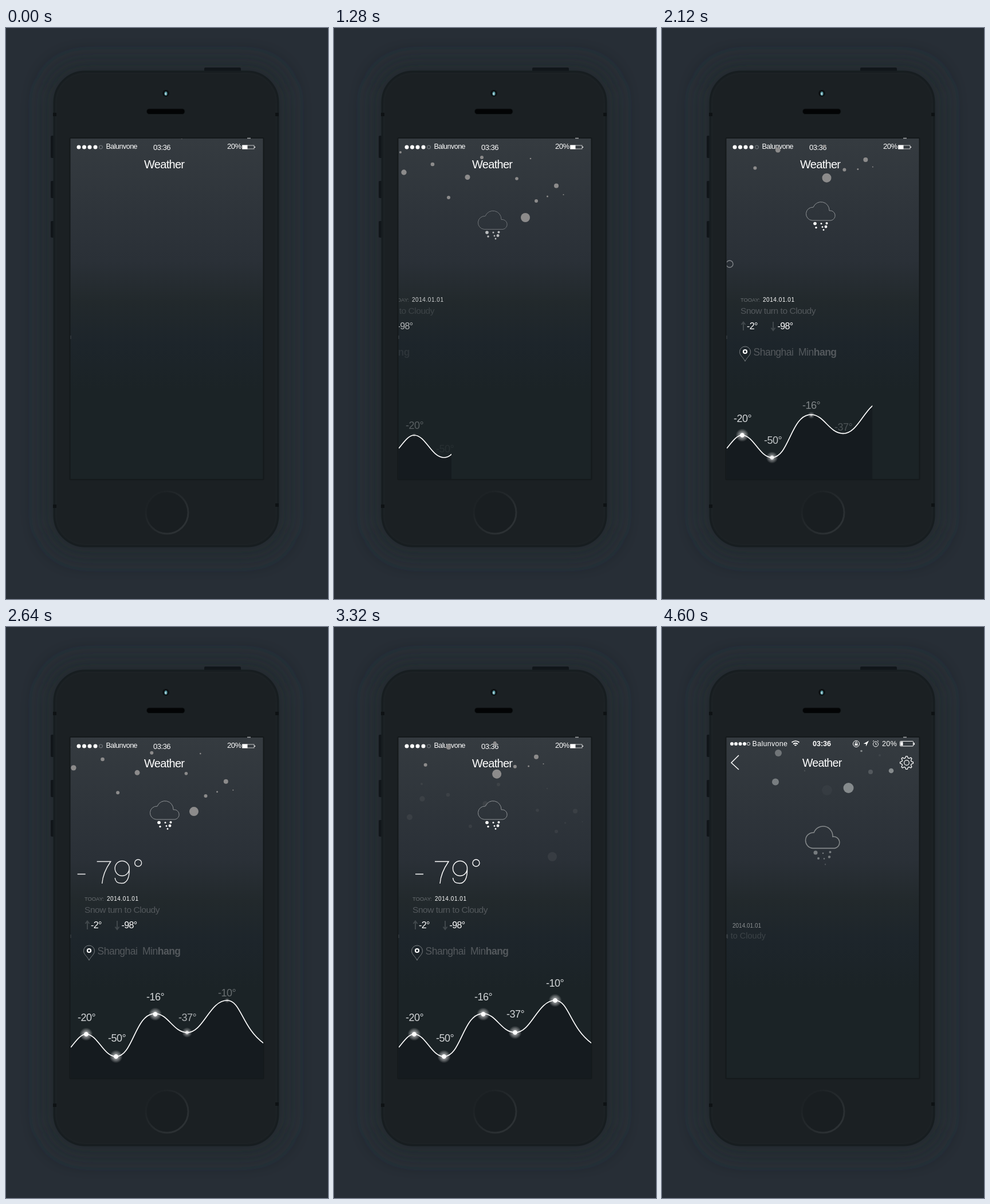
An HTML page for the animation above (5 s loop, 562x997 px).

```html
<!DOCTYPE html>
<html lang="en">
<head>
<meta charset="utf-8">
<title>Weather app</title>
<style>
  html, body { margin: 0; width: 100%; height: 100%; overflow: hidden; background: #272e36; }
  svg { display: block; width: 562px; height: 997px; }
  text { font-family: "Liberation Sans", Arial, sans-serif; fill: #fff; white-space: pre; }
  .line { fill: none; stroke: #fff; }
  .dim { fill: #54595d; }
  .status { font-size: 12.5px; letter-spacing: -.5px; }
  .temp { font-size: 16px; letter-spacing: -.6px; }
  .label { font-size: 18px; letter-spacing: -.5px; fill: #d3d6d8; }
</style>
</head>
<body>
<svg viewBox="0 0 562 997">
  <defs>
    <linearGradient id="sky" x1="0" y1="0" x2="0" y2="1">
      <stop offset="0" stop-color="#353b40"/>
      <stop offset=".36" stop-color="#2a3037"/>
      <stop offset=".48" stop-color="#22292c"/>
      <stop offset=".6" stop-color="#1d252b"/>
      <stop offset=".74" stop-color="#1b2326"/>
      <stop offset="1" stop-color="#1b2326"/>
    </linearGradient>
    <linearGradient id="rim" x1="0" y1="0" x2="1" y2="1">
      <stop offset=".2" stop-color="#1d2225"/>
      <stop offset="1" stop-color="#303538"/>
    </linearGradient>
    <radialGradient id="glow">
      <stop offset="0" stop-color="#fff"/>
      <stop offset=".3" stop-color="#fff"/>
      <stop offset=".38" stop-color="#fff" stop-opacity=".5"/>
      <stop offset="1" stop-color="#fff" stop-opacity="0"/>
    </radialGradient>
    <filter id="blur" x="-30%" y="-30%" width="160%" height="160%"><feGaussianBlur stdDeviation="20"/></filter>
    <clipPath id="screen"><rect x="113" y="193" width="336" height="595"/></clipPath>
    <clipPath id="reveal"><rect id="wipe" x="113" y="600" width="0" height="188"/></clipPath>
    <path id="cloudShape" d="M262 336A11.5 11.5 0 0 1 264 313A14.5 14.5 0 0 1 292 319A8.5 8.5 0 1 1 295 336Z"/>
  </defs>

  <!-- Phone -->
  <rect width="562" height="997" fill="#272e36"/>
  <rect x="68" y="60" width="423" height="861" rx="65" fill="#232c2d" filter="url(#blur)"/>
  <g fill="#11161a">
    <rect x="78" y="188" width="8" height="39" rx="2"/>
    <rect x="78" y="267" width="8" height="30" rx="2"/>
    <rect x="78" y="337" width="8" height="29" rx="2"/>
    <rect x="346" y="69" width="64" height="9" rx="2"/>
  </g>
  <rect x="84" y="76" width="391" height="829" rx="54" fill="#1b2023" stroke="#171d20" stroke-width="3"/>
  <rect x="87.500" y="79.500" width="384" height="822" rx="51" fill="none" stroke="#1e2427"/>
  <path d="M82 148h6v6h-6zM470 148h6v6h-6zM82 832h6v6h-6zM470 830h6v6h-6z" fill="#0e1214"/>
  <circle cx="279" cy="114" r="6" fill="#0d1113"/>
  <ellipse cx="279" cy="114.500" rx="2.500" ry="3.500" fill="#5c9ba5"/>
  <circle cx="278.500" cy="115" r="1.300" fill="#c9e6ea"/>
  <rect x="245.500" y="141" width="66.500" height="9.500" rx="4.500" fill="#030405" stroke="#14191b"/>
  <circle cx="281" cy="846" r="37" fill="#191e21" stroke="url(#rim)" stroke-width="3"/>
  <rect x="111.500" y="192" width="338" height="596.500" rx="1" fill="url(#sky)" stroke="#14191b" stroke-width="2"/>
  <path d="M421 192.500h6" stroke="#a4a7a9" stroke-width="1.500"/>
  <path d="M113 537v6" stroke="#43494d"/>

  <g id="app" clip-path="url(#screen)">
    <g class="status">
      <g fill="#fff"><circle cx="127" cy="208" r="3.500"/><circle cx="136.500" cy="208" r="3.500"/><circle cx="146" cy="208" r="3.500"/><circle cx="156" cy="208" r="3.500"/></g>
      <circle cx="165.500" cy="208" r="3" fill="none" stroke="#90969a" stroke-width=".8"/>
      <text x="174.500" y="211">Balunvone</text>
      <text x="257" y="213" font-size="13">03:36</text>
      <text x="386" y="211" font-size="13">20%</text>
      <rect x="412.500" y="205" width="20.500" height="6" class="line" stroke-width=".7"/>
      <path d="M412.500 204.500h9v7h-9zM433.500 207h1.500v2h-1.500z" fill="#fff"/>
    </g>
    <text x="241" y="245" font-size="20" letter-spacing="-.7">Weather</text>

    <g id="cloud">
      <use href="#cloudShape" fill="none" stroke="#8f9396"/>
      <g fill="#fff"><circle cx="267" cy="341.500" r="2.800"/><circle cx="278" cy="341.500" r="1.500"/><circle cx="287.500" cy="341" r="2"/><circle cx="286" cy="347" r="2.400"/><circle cx="269" cy="348.500" r="1.700"/><circle cx="280" cy="347.500" r="1.400"/><circle cx="282" cy="352.500" r="1.400"/></g>
    </g>

    <g id="reading" class="line" stroke-width="1.400">
      <path d="M142 431.500H156M176 409.500H200C192 421 186 434 185 448"/>
      <path d="M232.500 421.500A12.500 13 0 1 1 207.500 421.500A12.500 13 0 1 1 232.500 421.500C233 439 228 447.500 219 447.500C212 447.500 208 444 207.500 438"/>
      <circle cx="248" cy="412" r="6"/>
    </g>
    <g id="date">
      <text x="137" y="478" font-size="9.500" letter-spacing="-.1" style="fill:#686d70">TOOAY:</text>
      <text x="176" y="478" font-size="10" letter-spacing=".55">2014.01.01</text>
    </g>
    <text id="summary" class="dim" x="137" y="498.500" font-size="15.500" letter-spacing="-.45">Snow turn to Cloudy</text>
    <g id="range">
      <path d="M142 528V514M138.500 518L142 513.500L145.500 518M194 513V527M190.500 523.500L194 528L197.500 523.500" fill="none" stroke="#41484c" stroke-width="2"/>
      <text class="temp" x="148" y="526">-2°</text>
      <text class="temp" x="201.500" y="526">-98°</text>
    </g>
    <g id="place">
      <path d="M145 582C142 575 135.500 572 135.500 565.500A9.500 9.500 0 0 1 154.500 565.500C154.500 572 148 575 145 582Z" fill="none" stroke="#7e8386"/>
      <circle cx="145" cy="565" r="3" class="line" stroke-width="2.200"/>
      <text class="dim" x="159.500" y="572" font-size="17.500" letter-spacing="-.5">Shanghai</text>
      <text class="dim" x="238" y="572" font-size="17.500" letter-spacing="-.5">Min<tspan font-weight="bold">hang</tspan></text>
    </g>

    <g clip-path="url(#reveal)">
      <path id="area" fill="#141b1e" fill-opacity=".9"/>
      <path id="curve" class="line" stroke-width="1.700"/>
    </g>
    <g id="points"></g>
    <g id="snow" fill="#8c8b8b"></g>
  </g>

  <g id="cover" clip-path="url(#screen)" font-weight="bold">
    <g fill="#fff"><circle cx="122" cy="204" r="3"/><circle cx="129" cy="204" r="3"/><circle cx="136.500" cy="204" r="3"/><circle cx="144" cy="204" r="3"/></g>
    <circle cx="151" cy="204" r="2.600" class="line" stroke-width=".8"/>
    <text x="157.500" y="208" font-size="12.500" font-weight="normal" letter-spacing=".3">Balunvone</text>
    <path class="line" stroke-width="1.700" d="M226.500 201.500Q233 196.500 239.500 201.500M229 204.500Q233 201 237 204.500M231.500 207Q233 205.500 234.500 207"/>
    <text x="263" y="208" font-size="12.500">03:36</text>
    <g class="line">
      <circle cx="339" cy="204" r="5.500"/>
      <path d="M337.500 203.500v-1.500a1.500 1.500 0 0 1 3 0v1.500"/>
      <circle cx="373" cy="204.500" r="4.500"/>
      <path d="M373 202v3h2M368 200l2-2M378 200l-2-2"/>
      <rect x="415.500" y="199.500" width="23" height="8.500" rx="1"/>
      <path d="M134 224L121 237L134 249" stroke-width="1.500"/>
      <circle cx="427" cy="237" r="4.300" stroke-width="1.200"/>
      <path id="gear" stroke-width="1.300"/>
    </g>
    <path fill="#fff" d="M336.500 203.500h5v3.500h-5zM361 198.500L351.500 204H356V208.500ZM416.500 200.500h4v6.500h-4zM439.500 202h1.500v4h-1.500z"/>
    <text x="384" y="208" font-size="12.500" font-weight="normal" letter-spacing=".4">20%</text>
    <text x="245" y="244" font-size="19.500" font-weight="normal" letter-spacing="-.7">Weather</text>
    <use href="#cloudShape" transform="translate(250 346.500) scale(1.17 1.19) translate(-251 -302.500)" fill="none" stroke="#85898b" stroke-width="1.300"/>
    <g fill="#777c7f"><circle cx="268" cy="394" r="3.500"/><circle cx="281" cy="395" r="1.300"/><circle cx="293.500" cy="393" r="2"/><circle cx="292" cy="401.500" r="2.200"/><circle cx="273" cy="404" r="2"/><circle cx="283" cy="404.500" r="1.300"/><circle cx="285" cy="414.500" r="1.200" opacity=".5"/></g>
    <g fill="#858a8c"><circle cx="203" cy="220" r="6" opacity=".75"/><circle cx="198" cy="270.500" r="6" opacity=".85"/><circle cx="325.500" cy="281" r="9"/><circle cx="400" cy="251" r="4.300"/><circle cx="348" cy="216.500" r="1.800"/><circle cx="364" cy="253" r="4" opacity=".4"/><circle cx="288" cy="285" r="9" opacity=".08"/><circle cx="380" cy="224" r="2" opacity=".15"/><circle cx="249" cy="251" r="1.200" opacity=".3"/></g>
    <text x="123" y="525" font-size="10" font-weight="normal" style="fill:#8b8f91">2014.01.01</text>
    <text x="181" y="543.500" font-size="14.500" font-weight="normal" text-anchor="end" style="fill:#3d4448">Snow turn to Cloudy</text>
  </g>
</svg>

<script>
const LOOP = 5000, STEP = 40, COVER_AT = 4600;
const $ = id => document.getElementById(id);
const progress = (t, from, to) => Math.min(1, Math.max(0, (t - from) / (to - from)));

function add(parent, tag, attrs, text = "") {
  const el = document.createElementNS("http://www.w3.org/2000/svg", tag);
  for (const key in attrs) el.setAttribute(key, attrs[key]);
  el.textContent = text;
  return parent.appendChild(el);
}

function pose(el, x, y, opacity, scale = 1) {
  el.setAttribute("transform", `translate(${x} ${y}) scale(${scale})`);
  el.setAttribute("opacity", opacity);
}

// Temperature curve
const line = "M113 734C123 722 130 711 140 711C160 711 170 750 192 750C222 750 225 675 260 675" +
  "C283 675 292 708 316 708C345 708 355 652 386 652C410 652 412 700 450 727";
$("curve").setAttribute("d", line);
$("area").setAttribute("d", line + "V788H113Z");

// Gear outline: eight teeth
const teeth = Array.from({ length: 32 }, (_, i) => {
  const a = (i - 1.5) * Math.PI / 16, r = i % 4 === 1 || i % 4 === 2 ? 11.5 : 8.5;
  return `${427 + r * Math.cos(a)} ${237 + r * Math.sin(a)}`;
});
$("gear").setAttribute("d", `M${teeth.join("L")}Z`);

// Curve points: x, y, label, label x, label baseline, label rise
const WIPE_START = 803, WIPE_SPEED = 0.193;
const points = [
  [140, 711, "-20°", 125, 688, 18],
  [192, 750, "-50°", 178, 724, 18],
  [260.5, 676, "-16°", 245, 652, 29],
  [316, 708, "-37°", 301, 682, 29],
  [386, 652, "-10°", 370, 628, 29]
].map(([x, y, text, labelX, labelY, rise]) => ({
  x, y, rise,
  start: WIPE_START + (x - 113) / WIPE_SPEED,
  dot: add($("points"), "circle", { r: 11.5, fill: "url(#glow)" }),
  label: add($("points"), "text", { class: "label", x: labelX, y: labelY }, text)
}));

// Snowflakes: x, y, radius, drift x, drift y, seen DRIFT_AT ms into a shower
const DRIFT_AT = 1262, DRIFT_TIME = 603;
const flakes = [
  [334, 331, 8, 47, 70], [388, 275.5, 4, 33, 46], [353, 302, 3, 35, 55], [372.5, 294, 1.5, 31, 48],
  [400.5, 291, 1, 33, 49], [319, 263, 2.8, 36, 57], [343, 228, 1.3, 29, 54], [258, 226, 3, 29, 49],
  [233, 260.5, 4.5, 31, 48], [200, 296, 3, 38, 52], [172, 238, 3.3, 27, 55], [122, 252, 4.7, 32, 48],
  [116, 217, 2, 37, 57], [100, 284, 5, 32, 48]
];
const showers = [18, 1455, 2698].map(start => {
  const group = add($("snow"), "g", {});
  return { start, group, dots: flakes.map(f => add(group, "circle", { r: f[2] })) };
});

// Parts sliding in from the left: id, start, end, distance
const slides = [
  ["date", 520, 1480, 192],
  ["range", 600, 1640, 263],
  ["summary", 740, 1720, 207],
  ["place", 940, 2080, 246],
  ["reading", 1700, 2720, 221]
];

function draw(t) {
  const covered = t >= COVER_AT;
  $("app").style.display = covered ? "none" : "";
  $("cover").style.display = covered ? "" : "none";
  if (covered) return;

  const lift = progress(t, 440, 1680);
  pose($("cloud"), 0, 48 * (1 - lift), lift);

  for (const [id, from, to, distance] of slides) {
    const p = progress(t, from, to);
    pose($(id), -distance * (1 - p), 0, p);
  }

  $("wipe").setAttribute("width", Math.min(337, Math.max(0, (t - WIPE_START) * WIPE_SPEED)));
  for (const { x, y, rise, start, dot, label } of points) {
    const p = progress(t, start, start + 1000);
    pose(dot, x, y, p, p);
    pose(label, 0, rise * (1 - p), p);
  }

  for (const { start, group, dots } of showers) {
    const age = t - start, k = (age - DRIFT_AT) / DRIFT_TIME;
    group.setAttribute("opacity", age < -60 ? 0 : 1 - progress(age, 1290, 1950));
    dots.forEach((dot, i) => {
      const [x, y, , dx, dy] = flakes[i];
      dot.setAttribute("cx", x + dx * k);
      dot.setAttribute("cy", y + dy * k);
    });
  }
}

function tick() {
  draw(Math.floor(performance.now() % LOOP / STEP) * STEP);
  requestAnimationFrame(tick);
}
tick();
</script>
</body>
</html>
```
